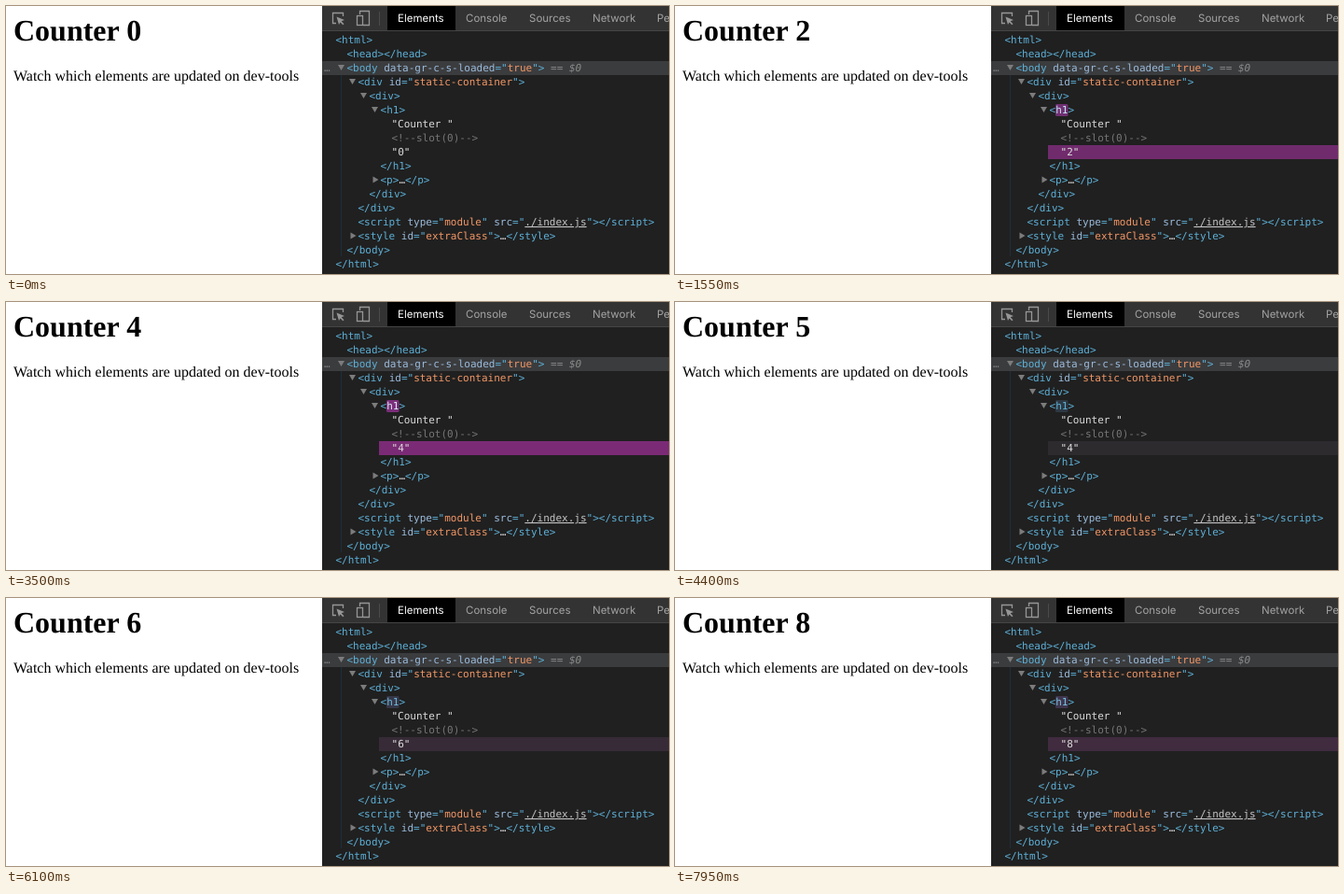
Write an HTML page that moves like this. It is 711x287 px and loops after 8 s.

```html
<!DOCTYPE html>
<html lang="en">
<head>
<meta charset="utf-8">
<title>Counter</title>
<style>
  html, body { margin: 0; width: 100%; height: 100%; overflow: hidden; background: #fff; }
  svg { display: block; width: 711px; height: 287px; }
  text { text-rendering: geometricPrecision; white-space: pre; }
  .page { font-family: "Liberation Serif", serif; font-size: 16px; fill: #000; }
  .page .title { font-size: 32px; font-weight: bold; }
  .tabs { font-family: Inter, sans-serif; font-size: 11.5px; fill: #a3a3a3; }
  .tabs .active { fill: #fff; }
  .icons { fill: none; stroke: #969696; stroke-width: 1.3; }
  .tree { font-family: "DejaVu Sans Mono", monospace; font-size: 11px; fill: #5db0d7; }
  .attr { fill: #9bbbdc; }
  .value { fill: #f29766; }
  .plain { fill: #dcdcdc; }
  .link { fill: #c4c4c4; text-decoration: underline; }
  .comment { fill: #757575; }
  .hint { fill: #8a8a8a; font-style: italic; }
  .arrow { fill: #7c7c7c; }

  /* Scrubbed: --age is the time in ms since the last DOM update. */
  .flash { animation: 1.4s calc(var(--age) * -1ms) paused both; }
  .flash.row { animation-name: row; }
  .flash.box { animation-name: box; }
  .flash.name { animation-name: name; }
  .idle .flash { animation: none; }
  rect.flash { fill: transparent; }
  @keyframes row {
    from { fill: rgb(146, 43, 139); animation-timing-function: cubic-bezier(0, 0, .2, 1); }
    80% { fill: rgb(45, 43, 46); }
    to { fill: #202020; }
  }
  @keyframes box {
    from { fill: rgb(146, 43, 139); animation-timing-function: cubic-bezier(0, 0, .2, 1); }
    80% { fill: rgb(44, 57, 66); }
    to { fill: #202020; }
  }
  @keyframes name {
    from { fill: #fff; animation-timing-function: cubic-bezier(0, 0, .2, 1); }
    80%, to { fill: #5db0d7; }
  }
</style>
</head>
<body>
<svg id="stage" class="idle" viewBox="0 0 711 287">
  <g class="page">
    <text class="title" x="8" y="37">Counter <tspan id="pageCount">0</tspan></text>
    <text x="8" y="80">Watch which elements are updated on dev-tools</text>
  </g>

  <rect x="339" width="372" height="287" fill="#202020"/>
  <rect x="339" width="372" height="26" fill="#333"/>
  <rect x="339" y="26" width="372" height="1" fill="#454545"/>
  <rect x="400" y="6" width="1" height="15" fill="#4a4a4a"/>
  <rect x="409" width="73" height="26" fill="#000"/>
  <g class="icons">
    <path d="M354 18.5H350.5V7.5H361.5V11"/>
    <path d="M354.5 11.5L363 15L359.7 16.2L362.5 19.2L361.3 20.3L358.5 17.4L357 20Z" fill="#969696" stroke="none"/>
    <path d="M379.5 9V5.5H389.5V20.5H383"/>
    <rect x="376.5" y="10.5" width="6" height="10"/>
  </g>
  <g class="tabs">
    <text class="active" x="420" y="17">Elements</text>
    <text x="493" y="17">Console</text>
    <text x="561" y="17">Sources</text>
    <text x="629" y="17">Network</text>
    <text x="698" y="17">Performance</text>
  </g>

  <rect x="339" y="59" width="372" height="15" fill="#3b3c3e"/>
  <rect x="359" y="74" width="1" height="194" fill="#1b303d"/>
  <rect class="flash row" x="400" y="149" width="311" height="15"/>
  <rect class="flash box" x="408" y="105" width="13.5" height="13" rx="1.5"/>
  <g id="tree" class="tree"></g>
</svg>
<script>
  const LOOP = 8000, PERIOD = 1000, PAGE_START = 375, TOOLS_START = 425;
  const byId = id => document.getElementById(id);
  const span = (kind, text) => `<tspan class="${kind}">${text}</tspan>`;
  const attr = (name, value, kind = 'value') => ` ${span('attr', name)}="${span(kind, value)}"`;
  const open = (name, attrs = '') => `&lt;${name}${attrs}&gt;`;
  const close = name => `&lt;/${name}&gt;`;
  const more = span('plain', '…');

  // Each row: indent level, markup, optional arrow direction.
  const rows = [
    [0, open('html')],
    [1, open('head') + close('head')],
    [1, open('body', attr('data-gr-c-s-loaded', 'true')) + span('hint', ' == $0'), 'down'],
    [2, open('div', attr('id', 'static-container')), 'down'],
    [3, open('div'), 'down'],
    [4, open(span('flash name', 'h1')), 'down'],
    [5, span('plain', '"Counter "')],
    [5, span('comment', '&lt;!--slot(0)--&gt;')],
    [5, span('plain', '"<tspan id="toolsCount">0</tspan>"')],
    [4, close('h1')],
    [4, open('p') + more + close('p'), 'right'],
    [3, close('div')],
    [2, close('div')],
    [2, open('script', attr('type', 'module') + attr('src', './index.js', 'link')) + close('script')],
    [2, open('style', attr('id', 'extraClass')) + more + close('style'), 'right'],
    [1, close('body')],
    [0, close('html')],
  ];
  const arrows = { down: 'm-9.5 -7h7l-3.5 6z', right: 'm-8 -7.5v7l6 -3.5z' };

  byId('tree').innerHTML = rows.map(([level, markup, arrow], i) => {
    const x = 353.5 + level * 12, y = 40 + i * 15;
    return (arrow ? `<path class="arrow" d="M${x} ${y}${arrows[arrow]}"/>` : '') +
      `<text x="${x}" y="${y}">${markup}</text>`;
  }).join('') + '<text class="arrow" x="341" y="70">...</text>'.replace('...', '…');

  const stage = byId('stage'), pageCount = byId('pageCount'), toolsCount = byId('toolsCount');
  const countAt = (t, start) => Math.max(0, Math.floor((t - start) / PERIOD) + 1);

  function draw() {
    const t = performance.now() % LOOP;
    const shown = countAt(t, TOOLS_START);
    pageCount.textContent = countAt(t, PAGE_START);
    toolsCount.textContent = shown;
    stage.classList.toggle('idle', shown === 0);
    stage.style.setProperty('--age', t - TOOLS_START - (shown - 1) * PERIOD);
    requestAnimationFrame(draw);
  }
  draw();
</script>
</body>
</html>
```
